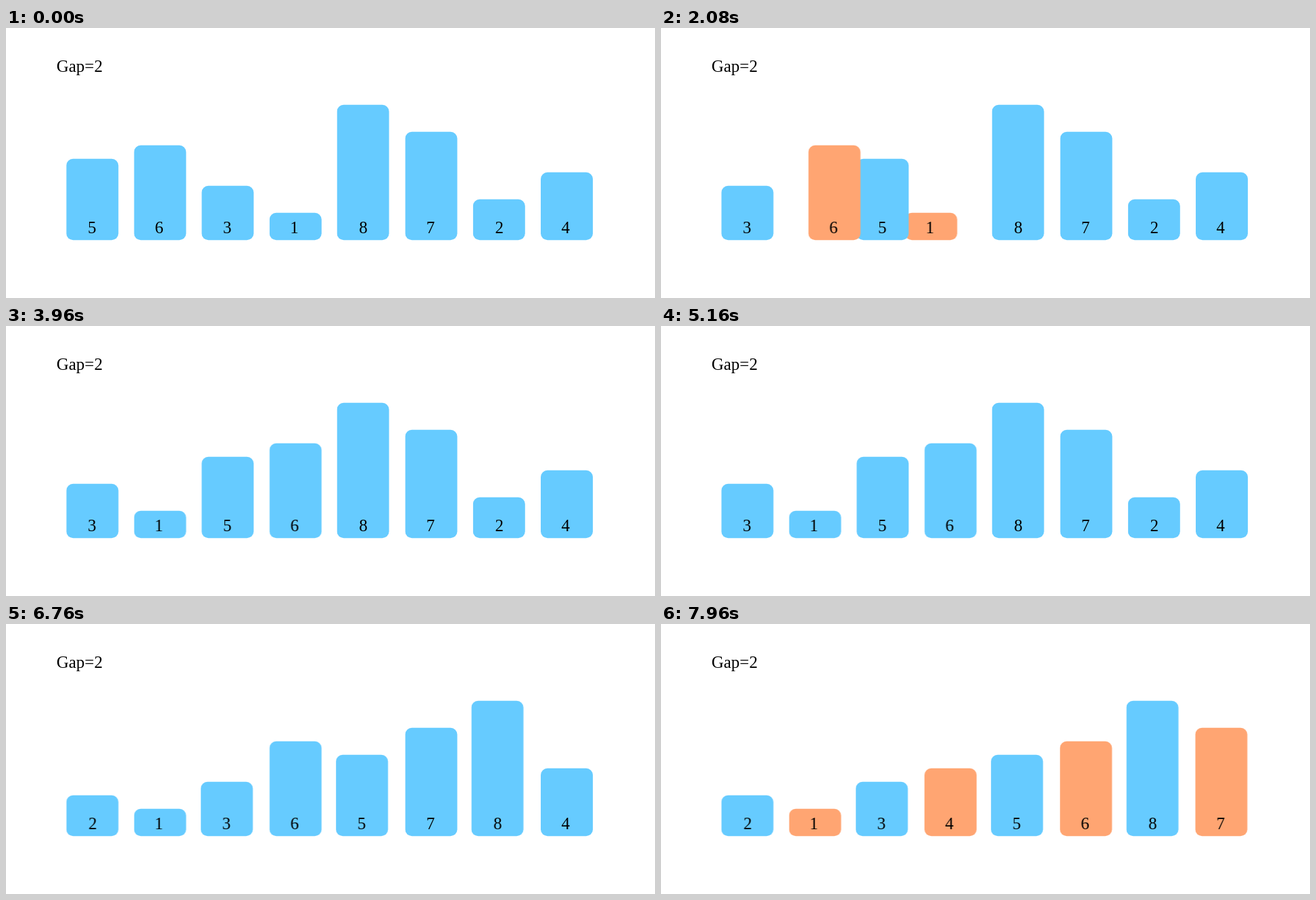
These frames come from a looping animation (960 by 400 pixels, 8000 ms). An HTML page:

```html
<!DOCTYPE html>
<html lang="en">
<head>
<meta charset="utf-8">
<title>Shell sort, gap 2</title>
<style>
  html, body { margin: 0; width: 100%; height: 100%; overflow: hidden; background: #fff; }
  svg { display: block; width: 960px; height: 400px; }
  text { font: 25px "Liberation Serif", "Times New Roman", serif; fill: #000; }

  .bar { --blue: #66cbff; --orange: #ffa572; fill: var(--blue); }
  .bar text { text-anchor: middle; }
  .bar { animation: 8s step-end infinite; }

  #b1 { animation-name: move1, hue1; transform: translateX(389.7px); }
  #b2 { animation-name: move2, hue2; transform: translateX(690.7px); }
  #b3 { animation-name: move3, hue3; transform: translateX(289.3px); }
  #b4 { animation-name: move4, hue4; transform: translateX(791px); }
  #b5 { animation-name: move5, hue5; transform: translateX(89.2px); }
  #b6 { animation-name: move6, hue6; transform: translateX(189.3px); }
  #b7 { animation-name: move7, hue7; transform: translateX(590.4px); }
  #b8 { animation-name: move8, hue8; transform: translateX(489.5px); }

  /* Swaps: 7-14.5%, 25-32%, 75-82%, 92.5-99.5%; one step per 40 ms */
  @keyframes move1 {
    25% { transform: translateX(389.7px); animation-timing-function: steps(14); }
    32%, 100% { transform: translateX(189.3px); }
  }
  @keyframes move2 {
    75% { transform: translateX(690.7px); animation-timing-function: steps(14); }
    82%, 100% { transform: translateX(89.2px); }
  }
  @keyframes move3 {
    7% { transform: translateX(289.3px); animation-timing-function: steps(15); }
    14.5% { transform: translateX(89.2px); }
    75% { transform: translateX(89.2px); animation-timing-function: steps(14); }
    82%, 100% { transform: translateX(288px); }
  }
  @keyframes move4 {
    92.5% { transform: translateX(791px); animation-timing-function: steps(14); }
    99.5%, 100% { transform: translateX(389.7px); }
  }
  @keyframes move5 {
    7% { transform: translateX(89.2px); animation-timing-function: steps(15); }
    14.5% { transform: translateX(289.3px); }
    75% { transform: translateX(289.3px); animation-timing-function: steps(14); }
    82%, 100% { transform: translateX(488px); }
  }
  @keyframes move6 {
    25% { transform: translateX(189.3px); animation-timing-function: steps(14); }
    32% { transform: translateX(389.7px); }
    92.5% { transform: translateX(389.7px); animation-timing-function: steps(14); }
    99.5%, 100% { transform: translateX(590px); }
  }
  @keyframes move7 {
    92.5% { transform: translateX(590.4px); animation-timing-function: steps(14); }
    99.5%, 100% { transform: translateX(790.2px); }
  }
  @keyframes move8 {
    75% { transform: translateX(489.5px); animation-timing-function: steps(14); }
    82%, 100% { transform: translateX(688.3px); }
  }

  @keyframes hue1 {
    0%, 34.5%, 64.5% { fill: var(--blue); }
    22.5%, 57.5%, 87.5%, 100% { fill: var(--orange); }
  }
  @keyframes hue2 {
    0%, 84.5%, 100% { fill: var(--blue); }
    70% { fill: var(--orange); }
  }
  @keyframes hue3 {
    0%, 17.5%, 49.5%, 84.5%, 100% { fill: var(--blue); }
    5%, 40%, 70% { fill: var(--orange); }
  }
  @keyframes hue4 {
    0% { fill: var(--blue); }
    87.5%, 100% { fill: var(--orange); }
  }
  @keyframes hue5 {
    0%, 17.5%, 49.5%, 84.5%, 100% { fill: var(--blue); }
    5%, 42.5%, 70% { fill: var(--orange); }
  }
  @keyframes hue6 {
    0%, 34.5%, 64.5% { fill: var(--blue); }
    22.5%, 60%, 87.5%, 100% { fill: var(--orange); }
  }
  @keyframes hue7 {
    0%, 64.5% { fill: var(--blue); }
    57.5%, 90%, 100% { fill: var(--orange); }
  }
  @keyframes hue8 {
    0%, 49.5%, 84.5%, 100% { fill: var(--blue); }
    40%, 72.5% { fill: var(--orange); }
  }
</style>
</head>
<body>
<svg viewBox="0 0 960 400">
  <text x="74.7" y="65">Gap=2</text>
  <g class="bar" id="b1"><rect y="273.7" width="77.1" height="40.6" rx="10"/><text x="36.7" y="304.3">1</text></g>
  <g class="bar" id="b2"><rect y="253.7" width="77.1" height="60.6" rx="10"/><text x="39.1" y="304.3">2</text></g>
  <g class="bar" id="b3"><rect y="233.7" width="77.1" height="80.6" rx="10"/><text x="38" y="304.3">3</text></g>
  <g class="bar" id="b4"><rect y="213.7" width="77.1" height="100.6" rx="10"/><text x="36.7" y="304.3">4</text></g>
  <g class="bar" id="b5"><rect y="193.7" width="77.1" height="120.6" rx="10"/><text x="38" y="304.3">5</text></g>
  <g class="bar" id="b6"><rect y="173.7" width="77.1" height="140.6" rx="10"/><text x="37.3" y="304.3">6</text></g>
  <g class="bar" id="b7"><rect y="153.7" width="77.1" height="160.6" rx="10"/><text x="37.7" y="304.3">7</text></g>
  <g class="bar" id="b8"><rect y="113.7" width="77.1" height="200.6" rx="10"/><text x="39.1" y="304.3">8</text></g>
</svg>
</body>
</html>
```
